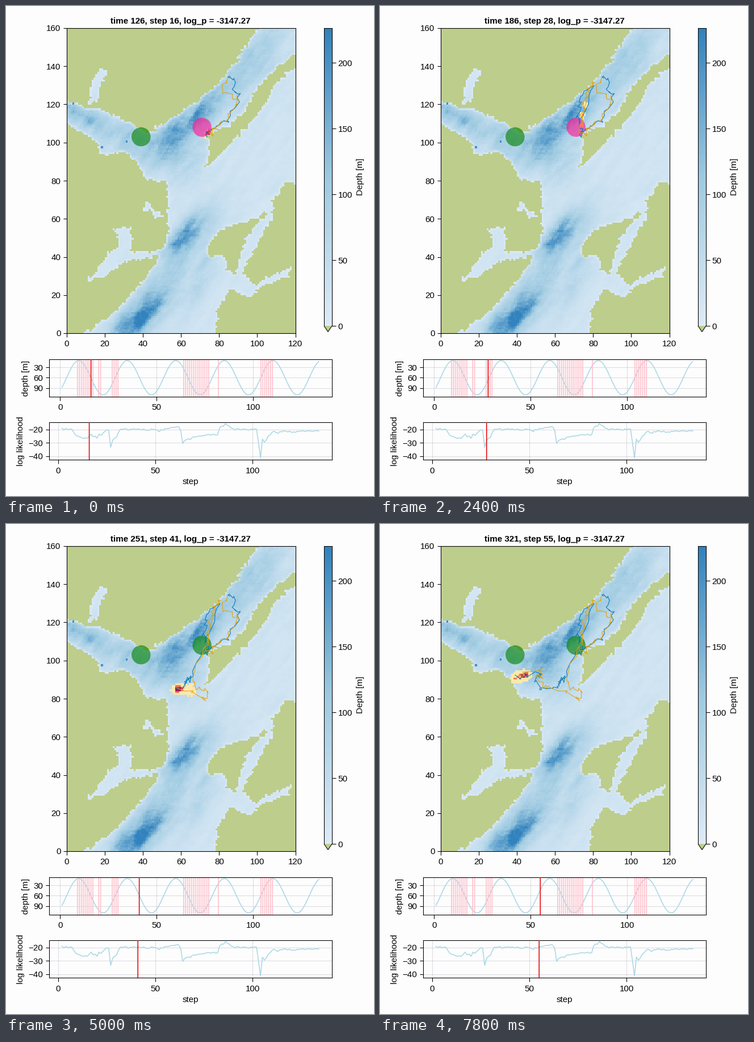
Animation, 648 px wide and 864 px high, one loop 8 s. Source, as a matplotlib script:

```python
import numpy as np
import matplotlib.pyplot as plt
from matplotlib.animation import FuncAnimation
from matplotlib.colors import BoundaryNorm, LinearSegmentedColormap, ListedColormap
from matplotlib.patches import Circle, Polygon
from matplotlib.path import Path

W, H = 648, 864
NX, NY = 120, 160
FRAMES, INTERVAL, FIRST = 40, 200, 16
PAPER, LAND = "#fdfdfd", "#bdcd8b"

plt.rcParams.update({
    "font.family": "Liberation Sans", "font.size": 15.12,
    "axes.linewidth": 1.08, "axes.facecolor": PAPER,
    "xtick.major.width": 1.08, "ytick.major.width": 1.08,
    "xtick.major.size": 6.5, "ytick.major.size": 6.5,
    "xtick.major.pad": 6, "ytick.major.pad": 4,
})

rng = np.random.default_rng(7)
X, Y = np.meshgrid(np.arange(NX) + 0.5, np.arange(NY) + 0.5)


def streaks(n, across=2):
    """Unit noise smeared along the south-west to north-east grain."""
    z = rng.normal(size=(NY, NX))
    z = sum(np.roll(z, (k, int(0.7 * k)), (0, 1)) for k in range(n))
    z = sum(np.roll(z, k, 1) for k in range(across))
    return z / z.std()


def bump(cx, cy, length, width, angle, amp):
    c, s = np.cos(np.radians(angle)), np.sin(np.radians(angle))
    u, v = (X - cx) * c + (Y - cy) * s, (Y - cy) * c - (X - cx) * s
    return amp * np.exp(-((u / length) ** 2 + (v / width) ** 2) / 2)


# ---------- coast: a few corners, roughened by warped lookups ----------
sound = [
    (101, 161), (90, 145), (81, 133), (71, 124), (56, 113), (42, 105), (34, 110),
    (22, 114.5), (17, 118), (9, 118.5), (6, 121), (-1, 121.5), (-1, 111), (8, 105),
    (15, 100), (19, 93.7), (31, 95), (38, 87.5), (42, 80.5), (52.5, 79), (53, 62),
    (53.5, 54), (49, 42), (42, 29), (34, 21), (23, 9.5), (13, 2), (3, -1), (78, -1),
    (79, 13), (86, 22.5), (96, 19), (103, 25.5), (116, 29), (117, 34), (108, 30),
    (99, 26), (92, 31), (96, 41), (103, 52), (108, 61), (108, 69), (114, 78.5),
    (121, 79), (121, 161)]
arm = [(50, 43.5), (49, 41.5), (37, 38.7), (31, 38), (19, 29), (10.5, 27.5), (16, 33),
       (21, 42), (28, 46), (27, 51), (24, 54.5), (34, 55.5), (33.5, 42.5)]
creek = [(11.5, 121), (13, 133), (18, 139), (21, 137), (18, 130), (15.5, 121)]
pond = [(40, 66), (42, 69), (50.5, 61.5), (46.5, 61), (43, 66), (41, 63)]
long_island = [
    (70.5, 85.5), (74.5, 91), (74.5, 104), (84, 108.5), (93, 116), (97, 124), (104, 133),
    (111, 140), (121, 147), (121, 139), (115, 137), (108, 128), (104, 121), (98, 113),
    (90, 104), (80, 93)]
south_island = [
    (104, 64), (99, 59.5), (88, 57), (81, 54), (74, 46), (74, 40.5), (83.5, 40),
    (84, 33.5), (88, 31), (91, 40), (94, 50), (99, 57), (105.5, 63)]

cells = np.c_[(X + 0.45 * streaks(2)).ravel(), (Y + 0.45 * streaks(2)).ravel()]


def inside(*outlines):
    return np.any([Path(o).contains_points(cells) for o in outlines], axis=0).reshape(NY, NX)


water = inside(sound, arm, creek, pond) & ~inside(long_island, south_island)

# ---------- depth: basins on a shallow shelf ----------
basins = [
    (61, 51, 7.5, 3.4, 51, 140), (65, 50, 15, 6, 55, 65),
    (44, 13, 13, 4.5, 50, 105), (33, 4, 8, 4, 35, 95), (40, 14, 18, 9, 48, 45),
    (71, 30, 14, 4, 65, 45), (59, 107, 13, 5.5, 40, 125), (74, 121, 11, 4, 48, 70),
    (96, 143, 20, 10, 57, 68), (6, 115, 12, 4, -25, 95), (34, 101, 16, 8, -15, 60),
    (62, 92, 10, 8, 40, 45)]
depth = 24 + sum(bump(*b) for b in basins)
depth *= 1 + 0.12 * streaks(9, 4) + 0.05 * streaks(3)
pad = np.pad(water.astype(float), 1, mode="edge")
shore = sum(pad[j:j + NY, i:i + NX] for j in range(3) for i in range(3)) / 9
depth = np.clip(depth * np.clip(1.6 * shore - 0.6, 0.15, 1), 1, 226)
depth = np.where(water, depth, np.nan)
for col, row in [(3, 120), (18, 97), (31, 100)]:
    depth[row, col] = 205

# ---------- tracks: (step, x, y) way points ----------
blue_way = [
    (0, 84, 134), (2, 88, 133), (4, 87, 128), (6, 91, 124), (8, 88, 118), (10, 85, 111.5),
    (13, 77, 107), (16, 73.5, 105), (19, 72, 114), (22, 73.5, 124), (25, 80, 130.5),
    (26.5, 76, 121), (28, 73, 109), (29.5, 71, 102), (31, 65, 91), (36, 63.5, 89),
    (39, 61, 85.5), (41, 57.5, 85), (44, 51, 85.5), (46, 50, 91.5), (49, 52, 92),
    (52, 52, 93.5), (53, 47, 92.5), (55, 39, 91)]
orange_way = [
    (0, 84, 135), (2, 83, 127), (4, 88, 124), (6, 90.5, 122), (8, 87.5, 117), (10, 83, 111),
    (13, 77, 107), (16, 74, 104), (19, 74, 115), (22, 75.5, 124), (25, 80, 131),
    (26.5, 76, 120), (28, 74, 109), (29.5, 70, 102), (31, 66, 92), (33, 68, 86),
    (36, 74.5, 83), (38, 71, 79.5), (40, 65, 85), (41, 57, 85), (44, 53, 87), (46, 50, 92),
    (49, 52, 91), (52, 53, 94), (53, 47.5, 93), (55, 39.5, 91)]
TICKS = np.arange(0, 55.1, 0.5)


def at(way, step):
    s, x, y = zip(*way)
    return np.array([np.interp(step, s, x), np.interp(step, s, y)])


def wander(way):
    return at(way, TICKS) + rng.normal(0, 0.85, (2, len(TICKS)))


blue_path, orange_path = wander(blue_way), wander(orange_way)
detections = [*range(9, 18), 20, 21, *range(27, 31), *range(64, 78), 82, *range(104, 111)]


def estimate(step):
    """Sharp core behind one track and wide halo behind the other."""
    size = 0.6 if step in detections else 1
    p = sum(bump(*at(blue_way, step - lag), 1.1 * size, 1.1 * size, 0, 0.7)
            + bump(*at(orange_way, step - lag), 2.8 * size, 2.2 * size, 40, 0.22)
            for lag in (0, 0.7, 1.4))
    p = p * np.random.default_rng(step).lognormal(0, 0.22, (NY, NX))
    return np.ma.masked_where((p < 0.16) | ~water, p)


# ---------- figure ----------
fig = plt.figure(figsize=(W / 72, H / 72), dpi=72, facecolor=PAPER)


def panel(x0, y0, x1, y1, xlim, ylim, xticks, yticks):
    ax = fig.add_axes([x0 / W, 1 - y1 / H, (x1 - x0) / W, (y1 - y0) / H])
    ax.set(xlim=xlim, ylim=ylim, xticks=xticks, yticks=yticks)
    return ax


def label(x, y, s, **kw):
    return fig.text(x / W, 1 - y / H, s, ha="center", **kw)


blues = LinearSegmentedColormap.from_list("depth", ["#deebf7", "#9ecae1", "#3182bd"])
blues.set_bad(LAND)
heat = ListedColormap(["#fde8ac", "#ef7b55", "#d8404a", "#a01a58", "#4a0c6b"])
grid_image = dict(origin="lower", extent=(0, NX, 0, NY), aspect="auto",
                  interpolation="nearest")

sea = panel(107, 39, 509.5, 577, (0, NX), (0, NY), range(0, 121, 20), range(0, 161, 20))
sea.imshow(depth, cmap=blues, vmin=0, vmax=226.3, **grid_image)
cloud = sea.imshow(estimate(FIRST), cmap=heat,
                   norm=BoundaryNorm([0.16, 0.75, 1, 1.3, 1.7, 9], 5), **grid_image)
sea.add_patch(Circle((39, 103), 5, fc="green", alpha=0.62, lw=0))
receiver = sea.add_patch(Circle((71, 108), 5, fc="green", alpha=0.62, lw=0))
blue_line, = sea.plot([], [], color="#0072b2", lw=1.2, alpha=0.85)
orange_line, = sea.plot([], [], color="#e69f00", lw=1.2, alpha=0.85)
title = label(307.6, 31.5, "", weight="bold")

bar = panel(560, 39, 574, 564, (0, 1), (0, 226.3), [], range(0, 201, 50))
bar.imshow(np.linspace(0, 1, 256)[:, None], cmap=blues, origin="lower",
           extent=(0, 1, 0, 226.3), aspect="auto")
bar.yaxis.tick_right()
bar.spines["bottom"].set_visible(False)
tip = [(560, 564), (567, 574.5), (574, 564)]
fig.add_artist(Polygon([(x / W, 1 - y / H) for x, y in tip], closed=False,
                       fc=LAND, ec="black", lw=1.08, transform=fig.transFigure))
label(624, 301, "Depth [m]", rotation=90, va="center")

dive = panel(76, 622.5, 573.5, 689, (-5.65, 140.65), (115.3, 5.7), [0, 50, 100], [30, 60, 90])
t = np.arange(1, 135)
dive.plot(t, 60 - 50 * np.cos((t - 9.66) / 4), color="lightblue", lw=1.62)
for d in detections:
    dive.axvline(d, color="pink", lw=1.62, snap=False)
label(35, 656, "depth [m]", rotation=90, va="center")

like = panel(76, 733.5, 573.5, 800, (-4.6, 140.6), (-42.75, -14.45),
             [0, 50, 100], [-40, -30, -20])
score_keys = [
    (2, -20), (7, -20), (9, -24.5), (13, -27), (17, -24.5), (20, -26), (24, -21), (26, -21),
    (27, -33.8), (28, -28), (30, -26), (32, -19.5), (52, -20.5), (61, -17.6), (63, -21),
    (64, -29.6), (67, -26.6), (77, -24), (82, -24), (83, -19), (86, -16), (90, -20),
    (102, -20), (104, -41.4), (105, -27.4), (106, -29), (110, -22), (134, -21)]
score = np.interp(t[1:], *zip(*score_keys)) + rng.normal(0, 0.5, len(t) - 1)
like.plot(t[1:], score, color="lightblue", lw=1.62)
label(26, 767, "log likelihood", rotation=90, va="center")
label(324.5, 843.5, "step")

for ax in (dive, like):
    ax.grid(color="#000030", alpha=0.13, lw=1.08)
    ax.set_axisbelow(True)
cursors = [ax.axvline(FIRST, color="#ea0a0e", lw=1.62, zorder=4, snap=False)
           for ax in (dive, like)]


def update(i):
    step = FIRST + i
    title.set_text(f"time {46 + 5 * step}, step {step}, log_p = -3147.27")
    cloud.set_data(estimate(step))
    receiver.set_facecolor("deeppink" if step in detections else "green")
    blue_line.set_data(blue_path[:, TICKS <= step])
    orange_line.set_data(orange_path[:, TICKS <= step])
    for c in cursors:
        c.set_xdata([step, step])
    return title, cloud, receiver, blue_line, orange_line, *cursors


anim = FuncAnimation(fig, update, frames=FRAMES, interval=INTERVAL, repeat=True,
                     repeat_delay=0, blit=False)
plt.show()
```
